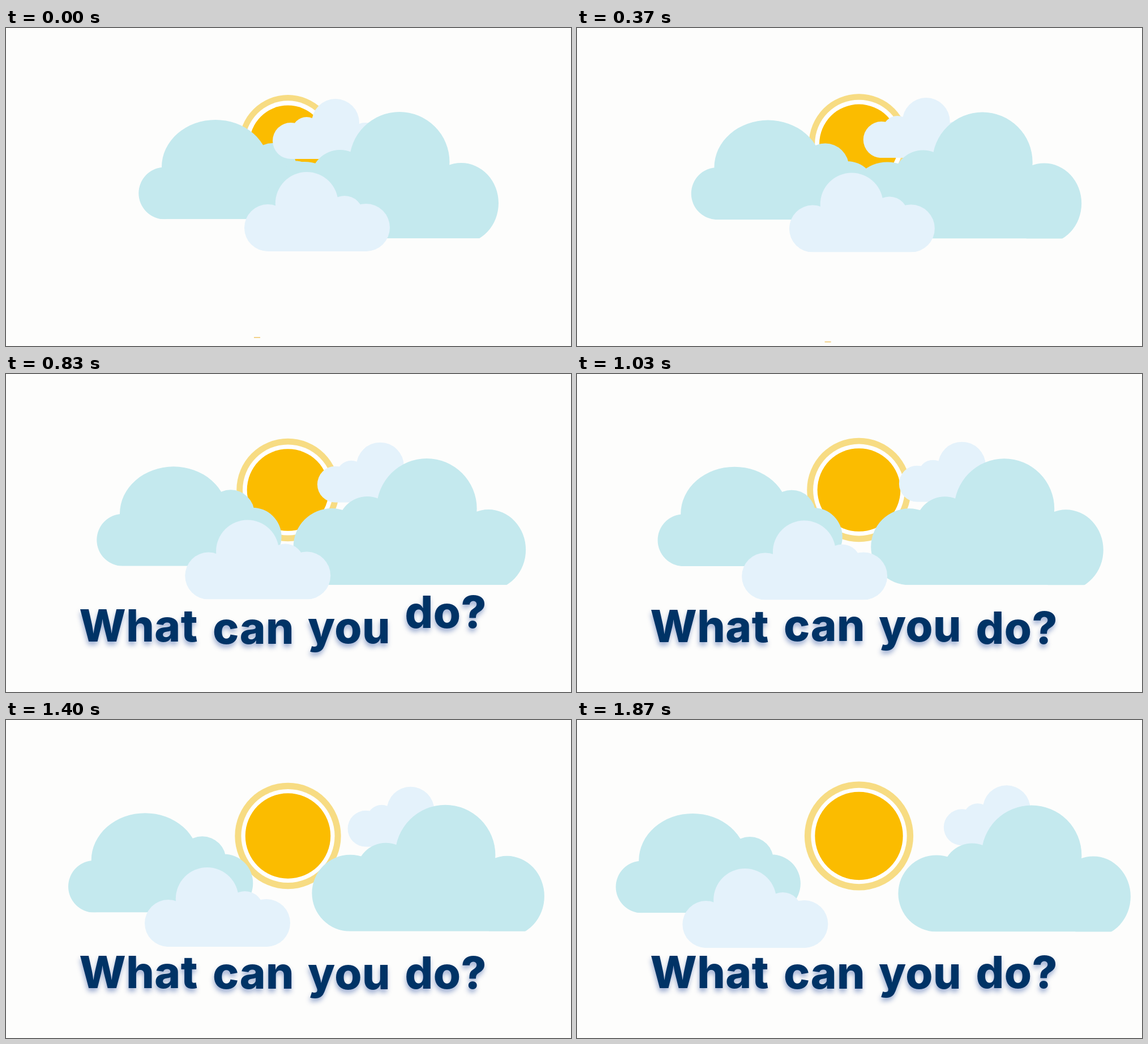
These frames come from a looping animation (998x561 px, 1910 ms). An HTML page with a canvas:

```html
<!DOCTYPE html>
<html lang="en">
<head>
<meta charset="utf-8">
<title>What can you do?</title>
<style>
  html, body { margin: 0; width: 100%; height: 100%; overflow: hidden; background: #fdfdfc; }
  canvas { display: block; }
</style>
</head>
<body>
<canvas id="stage" width="998" height="561"></canvas>
<script>
const W = 998, H = 561, LOOP = 1910;
const ctx = document.getElementById('stage').getContext('2d');
const SKY = '#c4e9ee';
const MIST = '#e4f2fb';

// Lobes run from left to right as [x, top, rx, ry]; all are cut flat at the base.
// Drift is in pixels per second.
function makeCloud(color, base, drift, lobes) {
  const path = new Path2D();
  const [first, last] = [lobes[0], lobes[lobes.length - 1]];
  const depth = 1.5 * first[2];
  path.rect(first[0], base - depth, last[0] - first[0], depth);
  for (const [x, top, rx, ry = rx] of lobes) {
    path.moveTo(x + rx, top + ry);
    path.ellipse(x, top + ry, rx, ry, 0, 0, 2 * Math.PI);
  }
  return { color, base, drift, path };
}

// From back to front.
const clouds = [
  makeCloud(SKY, 337.3, [-88.8, 1.6],
    [[280.3, 245.5, 46], [370, 162, 95, 83], [471, 203, 42], [509.3, 234.3, 51.3]]),
  makeCloud(MIST, 231, [94.7, -5.2],
    [[503, 167, 32], [531, 157, 26], [582, 125, 42], [635, 167, 32]]),
  makeCloud(SKY, 371, [57.8, 1.3],
    [[527, 236, 67.5], [590, 215, 52], [695, 148, 88.5], [804, 238, 66, 71]]),
  makeCloud(MIST, 394, [-125.7, 4.3],
    [[462.5, 311, 41.5], [531.3, 254, 55.5], [598, 296, 33], [636, 310, 42]])
];

function drawCloud({ color, base, drift, path }, t) {
  ctx.save();
  ctx.translate(drift[0] * t / 1000, drift[1] * t / 1000);
  ctx.beginPath();
  ctx.rect(-W, -H, 3 * W, H + base);
  ctx.clip();
  ctx.fillStyle = color;
  ctx.fill(path);
  ctx.restore();
}

function disc(r, color) {
  ctx.beginPath();
  ctx.arc(498, 204.5, r, 0, 2 * Math.PI);
  ctx.fillStyle = color;
  ctx.fill();
}

function drawSun(t) {
  const r = 86.4 + 0.0052 * t;
  disc(r, '#f7dc83');
  disc(r * 0.8815, '#ffffff');
  disc(r - 18.4, '#fbbc00');
}

// Each word with the middle of its ink.
const WORDS = [['What', 234], ['can', 436], ['you', 604], ['do?', 776]];
const BASELINE = 473.5;

// A fast fall followed by a soft, fading bounce.
function dropAt(s) {
  const fall = -28 * Math.exp(-s / 40);
  const bounce = s > 0 ? 5.5 * Math.exp(-s / 450) * Math.sin(2 * Math.PI * s / 530) : 0;
  return fall + bounce;
}

function drawWords(t) {
  ctx.save();
  ctx.font = '800 78px Inter, "Open Sans", sans-serif';
  ctx.letterSpacing = '0.5px';
  ctx.fillStyle = '#003366';
  ctx.shadowColor = 'rgba(0, 45, 140, 0.36)';
  ctx.shadowBlur = 8;
  ctx.shadowOffsetX = -1;
  ctx.shadowOffsetY = 6;
  WORDS.forEach(([word, x], i) => {
    const s = t - 530 - 100 * i;
    if (s < -70) return;
    const ink = ctx.measureText(word);
    const shift = (ink.actualBoundingBoxLeft - ink.actualBoundingBoxRight) / 2;
    ctx.globalAlpha = Math.min(1, (s + 70) / 60);
    ctx.fillText(word, x + shift, BASELINE + dropAt(s));
  });
  ctx.restore();
}

function drawRay(t) {
  ctx.fillStyle = '#f3d28a';
  ctx.fillRect(438 - 0.001 * t, 545 + 0.021 * t, 11, 2);
}

// Thirty pictures a second, each change rounded to 10 ms.
function stepTime(ms) {
  const part = ms % 100;
  const n = 3 * Math.floor(ms / 100) + (part >= 30) + (part >= 70);
  return n * 100 / 3;
}

function draw(t) {
  ctx.fillStyle = '#fdfdfc';
  ctx.fillRect(0, 0, W, H);
  drawRay(t);
  drawSun(t);
  clouds.forEach(cloud => drawCloud(cloud, t));
  drawWords(t);
}

const start = performance.now();
function tick() {
  draw(stepTime((performance.now() - start) % LOOP));
  requestAnimationFrame(tick);
}
tick();
</script>
</body>
</html>
```
